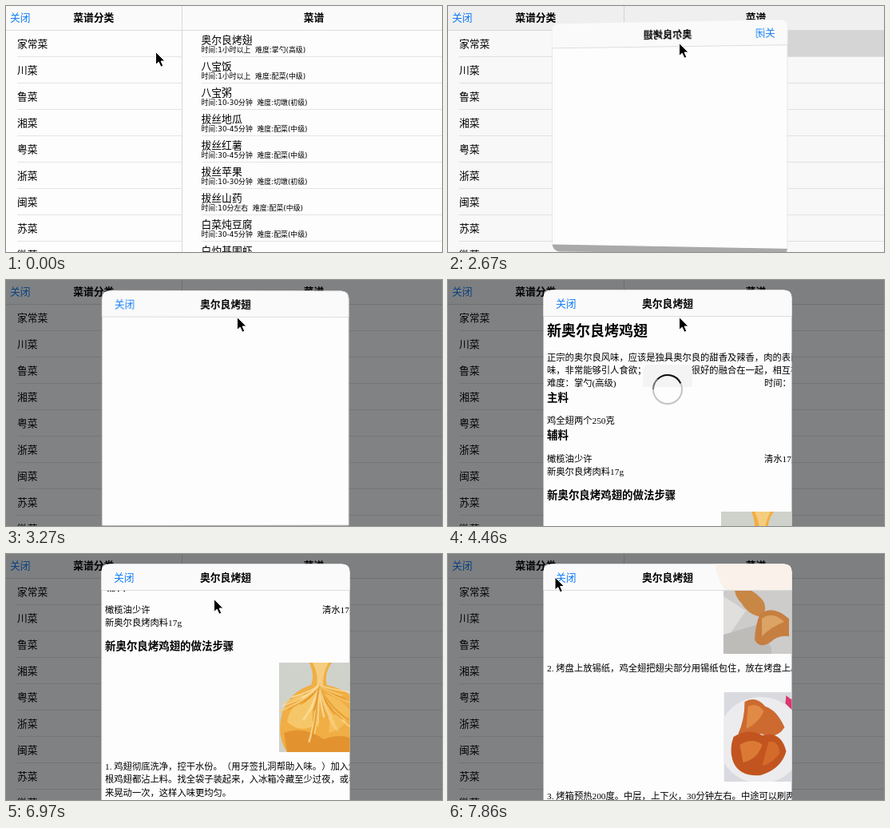
An HTML page for the animation above (8 s loop, 546x308 px).

```html
<!DOCTYPE html>
<html lang="zh-CN">
<head>
<meta charset="utf-8">
<title>菜谱</title>
<style>
html, body { margin: 0; width: 100%; height: 100%; overflow: hidden; background: #fdfdfd; }
#stage { position: fixed; left: 0; top: 0; width: 546px; height: 308px; overflow: clip; contain: strict; }
#stage > svg { position: absolute; left: 0; top: 0; width: 546px; height: 308px; }
text {
  white-space: pre; fill: #000; text-spacing-trim: space-all; font-kerning: none;
  font-family: "Noto Sans CJK SC", "Noto Sans CJK", sans-serif;
}
.b { font-weight: 700; }
.link { fill: #127cf5; }
.sub { font-family: "DejaVu Sans", "Noto Sans CJK SC", "Noto Sans CJK", sans-serif; }
.page { font-family: "Liberation Serif", "Noto Sans CJK SC", "Noto Sans CJK", serif; }
#sheet { transform-origin: 275px 160px; }
</style>
</head>
<body>
<div id="stage">
<svg id="back" viewBox="0 0 546 308"></svg>
<svg id="sheet" viewBox="0 0 546 308"></svg>
<svg id="top" viewBox="0 0 546 308">
  <path id="cursor" d="M.5 .5V16.5L4.2 13.2L7 19.3L9.8 18L7.1 12H12Z" fill="#000" stroke="#fff" stroke-width="1"/>
</svg>
</div>
<script>
const LOOP = 8000, TICKS = 54;
const $ = id => document.getElementById(id);

// text placed by the vertical centre of its characters
const label = (x, cy, size, str, cls = '', anchor = 'start') =>
  `<text x="${x}" y="${cy + size * 0.38}" font-size="${size}" class="${cls}" text-anchor="${anchor}">${str}</text>`;
const box = (x, y, w, h, fill, more = '') =>
  `<rect x="${x}" y="${y}" width="${w}" height="${h}" fill="${fill}" ${more}/>`;
const shape = (d, fill, more = '') => `<path d="${d}" fill="${fill}" ${more}/>`;

// ---- recipe lists ----
const groups = ['家常菜', '川菜', '鲁菜', '湘菜', '粤菜', '浙菜', '闽菜', '苏菜', '徽菜'];
const low = '切墩(初级)', mid = '配菜(中级)', high = '掌勺(高级)';
const dishes = [
  ['奥尔良烤翅', '1小时以上', high],
  ['八宝饭', '1小时以上', mid],
  ['八宝粥', '10-30分钟', low],
  ['拔丝地瓜', '30-45分钟', mid],
  ['拔丝红薯', '30-45分钟', mid],
  ['拔丝苹果', '10-30分钟', low],
  ['拔丝山药', '10分左右', mid],
  ['白菜炖豆腐', '30-45分钟', mid],
  ['白灼基围虾', '30-45分钟', mid]
];

const rows = dishes.map(([name, time, level], i) => {
  const y = 33 * i;
  return label(14, 47 + y, 12.8, groups[i]) +
    label(244.5, 42 + y, 12.8, name) +
    label(244.5, 55 + y, 8.9, `时间:${time}  难度:${level}`, 'sub') +
    box(14, 63 + y, 206, 1, '#e4e4e4') + box(245, 63 + y, 301, 1, '#e4e4e4');
}).join('');

$('back').innerHTML =
  box(0, 0, 546, 308, '#fdfdfd') +
  box(221, 31, 325, 32, '#d9d9d9', 'id="press"') + rows +
  box(0, 0, 546, 30, '#fafafa', 'id="bar"') + box(0, 30, 546, 1, '#dcdcdc') +
  box(220, 0, 1, 308, '#d8d8d8') +
  label(5, 14, 12.8, '关闭', 'link') +
  label(109.8, 14, 12.8, '菜谱分类', 'b', 'middle') +
  label(385.5, 14, 12.8, '菜谱', 'b', 'middle') +
  box(0, 0, 546, 308, '#03060b', 'id="dim" opacity="0"');

// ---- pictures in the recipe ----
let seed = 7;
const rand = () => (seed = seed * 16807 % 2147483647) / 2147483647;

// creases fan out from the neck of the bag
const creases = Array.from({ length: 34 }, (_, i) => {
  const a = Math.PI * (0.04 + 0.92 * rand()), r = 24 + 52 * rand();
  const x = 50 + Math.cos(a) * r * 0.8, y = 30 + Math.sin(a) * r;
  return shape(`M50 28Q${50 + (x - 50) * 0.3} ${28 + (y - 28) * 0.6} ${x} ${y}`, 'none',
    `stroke="${['#fbe2a4', '#e59020', '#f7cf7c'][i % 3]}" stroke-width="${1 + 1.6 * rand()}" opacity=".75"`);
}).join('');
const bag =
  box(0, 0, 100, 112, '#cfd2cb') +
  shape('M38 0Q45 18 40 28Q14 36 4 62Q-4 92 10 112H100V50Q86 34 60 28Q56 14 66 0Z', '#f0ae44') +
  shape('M38 38Q14 52 10 74Q24 88 42 80Q40 58 46 38Z', '#f6c768') +
  shape('M54 38Q66 60 62 88Q82 84 90 62Q78 44 54 38Z', '#f4bd58') +
  shape('M6 88Q30 78 56 96Q76 88 94 96V112H10Z', '#e2932f') +
  shape('M42 0Q50 16 47 30H55Q54 14 62 0Z', '#f5cd80') + creases;
const foil =
  box(0, 0, 100, 112, '#cdccca') +
  shape('M0 40L28 58L10 84L32 112H0Z', '#e0dfdd') +
  shape('M0 88L40 76L60 104V112H0Z', '#bdbcb9') +
  shape('M14 30Q34 26 50 46Q56 58 46 66Q30 62 22 48Q14 40 14 30Z', '#c98746') +
  shape('M46 62Q62 50 82 68V90Q68 88 58 98Q44 106 39 94Q40 74 46 62Z', '#c67f40') +
  shape('M48 68Q62 58 76 72Q60 78 48 90Z', '#dba364');
const plate =
  box(0, 0, 100, 112, '#d9dadf') +
  '<ellipse cx="46" cy="60" rx="54" ry="54" fill="#ececef"/>' +
  shape('M78 4L84 9L90 2V26L83 20L77 14Z', '#d8376f') +
  shape('M26 12Q40 4 52 18Q66 22 76 44Q66 60 46 52Q26 62 18 52Q26 34 26 12Z', '#cc6a30') +
  shape('M12 56Q30 44 48 54Q72 48 78 74Q72 96 46 104Q20 106 12 88Q6 72 12 56Z', '#c2551f') +
  shape('M30 18Q42 12 50 24Q44 38 28 46Z', '#e08a45') +
  shape('M20 66Q36 56 48 66Q42 84 24 88Z', '#dc7a35') +
  shape('M56 62Q68 60 70 76Q60 90 48 92Z', '#d56b2a');
const picture = (x, y, art) =>
  `<svg x="${x}" y="${y}" width="100" height="112" viewBox="0 0 100 112">${art}</svg>`;

// ---- recipe sheet ----
const body = (x, y, str) => label(x, y, 11.3, str, 'page');
const head = (y, str) => label(124, y, 13.45, str, 'page b');
const article =
  label(124, 63, 18, '新奥尔良烤鸡翅', 'page b') +
  body(124, 97, '正宗的奥尔良风味，应该是独具奥尔良的甜香及辣香，肉的表面') +
  body(124, 112.5, '味，非常能够引人食欲；甜味与辣味很好的融合在一起，相互衬') +
  body(124, 128.5, '难度：掌勺(高级)') + body(396, 128.5, '时间：1小时') +
  head(147, '主料') + body(124, 176, '鸡全翅两个250克') +
  head(194, '辅料') + body(124, 223.5, '橄榄油少许') + body(396, 223.5, '清水17g') +
  body(124, 240, '新奥尔良烤肉料17g') +
  head(269, '新奥尔良烤鸡翅的做法步骤') +
  picture(342, 290, bag) +
  body(124, 420, '1. 鸡翅彻底洗净，控干水份。（用牙签扎洞帮助入味。）加入烤') +
  body(124, 436, '根鸡翅都沾上料。找全袋子装起来，入冰箱冷藏至少过夜，或者') +
  body(124, 452.5, '来晃动一次，这样入味更均匀。') +
  picture(345, 484, foil) +
  body(124, 613.5, '2. 烤盘上放锡纸，鸡全翅把翅尖部分用锡纸包住，放在烤盘上。') +
  picture(345.5, 644, plate) +
  body(124, 774, '3. 烤箱预热200度。中层，上下火，30分钟左右。中途可以刷两');

const face = 'M119.5 308V22.4Q119.5 12.4 129.5 12.4H420.5Q430.5 12.4 430.5 22.4V308Z';
$('sheet').innerHTML =
  `<defs><clipPath id="view"><rect x="119.5" y="46" width="311" height="262"/></clipPath>
   <clipPath id="edge"><path d="${face}"/></clipPath></defs>` +
  box(119.5, 12.4, 311, 305, '#a9a9a9', 'rx="10" id="foot"') + shape(face, '#fdfdfd') +
  `<g clip-path="url(#view)"><g id="article">${article}</g></g>
   <g clip-path="url(#edge)">${box(119, 12, 312, 33, '#fafafa')}${shape('M335 12H431V45H347Q336 30 335 12Z', '#f9f1ea', 'id="tint"')}
   ${box(119, 45, 312, 1, '#dcdcdc')}</g>` +
  label(135, 28.7, 12.8, '关闭', 'link') +
  label(275, 28.7, 12.8, '奥尔良烤翅', 'b', 'middle') +
  `<g id="hud">${box(244, 106, 62, 62, '#fdfdfd', 'rx="8"')}${shape('M244 134V114Q244 106 252 106H298Q306 106 306 114V134Z', '#f4f4f4')}
   <g id="ring" fill="none" stroke-width="2"><circle cx="275" cy="137" r="18" stroke="#c4c4c4"/>
   <path d="M262.3 124.3A18 18 0 0 1 291.3 129.4" stroke="#111"/><path d="M257 137A18 18 0 0 1 262.3 124.3" stroke="#777"/></g></g>`;
$('sheet').style.overflow = 'visible';

// ---- motion, in ticks ----
const pointer = [
  [0, 187, 57], [1, 255, 51], [2, 314, 46], [4, 314, 46], [5, 205, 48], [6, 115, 51],
  [8, 115, 51], [11, 100, 53], [12, 100, 53], [16, 289, 46], [37, 289, 46], [42, 265, 125],
  [43, 265, 122], [44, 265, 122], [45, 264, 105], [47, 260, 56], [49, 255, 2],
  [50, 252, 70], [51, 228, 58], [52, 172, 40], [53, 133.5, 28.5]
];
const scroll = [
  [40, 0], [42, 5], [43, 8], [44, 8], [45, 45], [46, 100], [47, 154],
  [48, 205], [49, 270], [50, 340], [51, 402], [52, 446], [53, 471]
];

function along(keys, k, c) {
  if (k <= keys[0][0]) return keys[0][c];
  for (let i = 1; i < keys.length; i++) {
    const a = keys[i - 1], b = keys[i];
    if (k <= b[0]) return a[c] + (b[c] - a[c]) * (k - a[0]) / (b[0] - a[0]);
  }
  return keys[keys.length - 1][c];
}
const smooth = u => { u = Math.min(1, Math.max(0, u)); return u * u * (3 - 2 * u); };
const show = (id, on) => { $(id).style.display = on ? '' : 'none'; };

function draw(ms) {
  const k = Math.floor((ms % LOOP) / LOOP * TICKS);   // the screen refreshes in even ticks
  $('cursor').setAttribute('transform', `translate(${along(pointer, k, 1)} ${along(pointer, k, 2)})`);

  const pressed = k >= 17 && k < 20;
  show('press', pressed);
  $('bar').setAttribute('fill', pressed ? '#f4f4f4' : '#fafafa');

  const flip = smooth((k - 17.45) / 4.7);
  $('dim').setAttribute('opacity', 0.5 * flip);
  show('sheet', flip > 0);
  show('foot', flip < 1);
  const angle = 180 * (1 - flip);
  const size = 1 - 0.23 * Math.pow(Math.abs(Math.sin(angle * Math.PI / 180)), 0.75);
  $('sheet').style.transform = flip < 1
    ? `perspective(920px) scale3d(${size},${size},${size}) rotateY(${angle}deg)` : 'none';

  const y = along(scroll, k, 1);
  show('article', k >= 30);
  $('article').setAttribute('transform', `translate(0 ${-y})`);
  $('tint').setAttribute('opacity', smooth((y - 440) / 30));
  show('hud', k >= 30 && k < 37);
  $('ring').setAttribute('transform', `rotate(${(k - 30) * 53} 275 137)`);
}

function loop() {
  draw(performance.now());
  requestAnimationFrame(loop);
}
loop();
</script>
</body>
</html>
```
